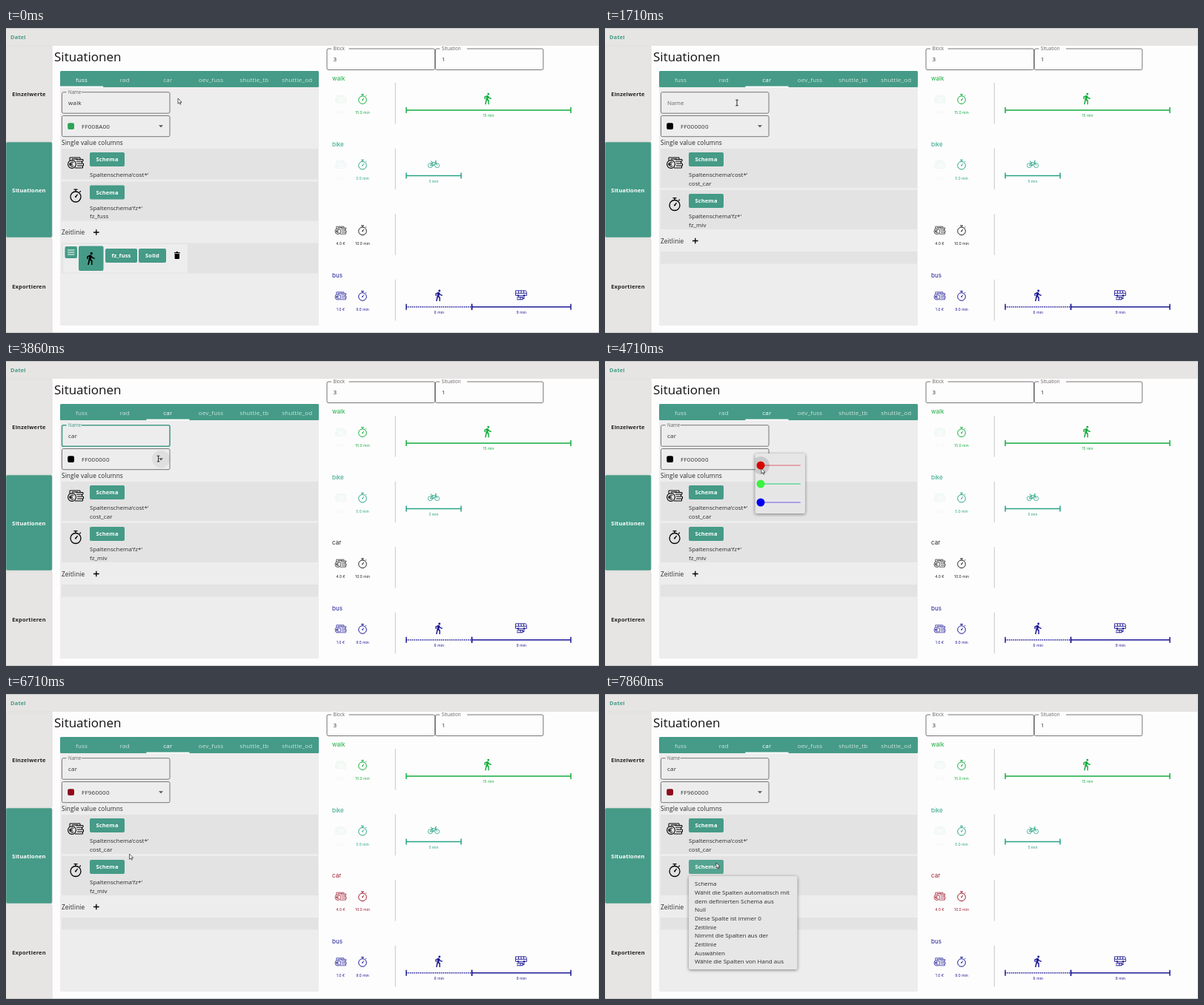
Animation of 800x412 px, one loop 8 s. Source, as an HTML page:

```html
<!DOCTYPE html>
<html lang="de">
<head>
<meta charset="utf-8">
<title>Situationen</title>
<style>
  html, body { margin: 0; width: 100%; height: 100%; overflow: hidden; background: #fefdfe; }
  svg { display: block; width: 100%; height: 100%; }
  text { font: 8px "Open Sans", "Noto Sans", sans-serif; fill: #2b2b2b; white-space: pre; }
  .title { font-size: 17px; fill: #111; }
  .bold { font-size: 7.5px; font-weight: 700; letter-spacing: .15px; }
  .head { font-size: 8.3px; letter-spacing: .1px; }
  .tab { letter-spacing: .2px; text-anchor: middle; }
  .field { letter-spacing: .25px; }
  .plot { font: 8px Inter, sans-serif; fill: currentColor; }
  .tiny { font: 5.1px Inter, sans-serif; fill: currentColor; text-anchor: middle; }
  .line { fill: none; stroke: currentColor; }
  .shadow { filter: drop-shadow(0 1px 2px #0007); }
</style>
</head>
<body>
<svg id="stage" viewBox="0 0 800 412"></svg>
<script>
const TEAL = '#459b87', PANEL = '#eeedee', ROW = '#e3e3e3', PAGE = '#fefdfe', GREY = '#777';
const LOOP = 8000, STEP = 1000 / 7;
const stage = document.getElementById('stage');

const clamp = v => Math.max(0, Math.min(1, v));
const mix = (a, b, p) => a + (b - a) * p;
const rect = (x, y, w, h, fill, r = 0, extra = '') =>
  `<rect x="${x}" y="${y}" width="${w}" height="${h}" rx="${r}" fill="${fill}" ${extra}/>`;
const text = (x, y, s, cls = '', extra = '') => `<text x="${x}" y="${y}" class="${cls}" ${extra}>${s}</text>`;
const circle = (x, y, r, fill, extra = '') => `<circle cx="${x}" cy="${y}" r="${r}" fill="${fill}" ${extra}/>`;
const line = (d, width = 1, extra = '') => `<path d="${d}" class="line" stroke-width="${width}" ${extra}/>`;
const group = (x, y, scale, body, extra = '') =>
  `<g transform="translate(${x} ${y}) scale(${scale})" ${extra}>${body}</g>`;
const button = (x, y, w, label) => rect(x, y, w, 19, TEAL, 2) +
  text(x + w / 2, y + 12.3, label, 'bold', 'style="fill:#fff;text-anchor:middle"');

// Icons are centred on their origin.
const walker = `<path transform="translate(-12.5 -12.3)" fill="currentColor" d="M13.5 5.5a2 2 0 1 0 0-4 2 2 0 0 0 0 4z
  M9.8 8.9L7 23h2.1l1.8-8 2.1 2v6h2v-7.5l-2.1-2 .6-3C14.8 12 16.8 13 19 13v-2c-1.9 0-3.5-1-4.3-2.4l-1-1.6
  c-.7-1.1-1.8-1.1-2.5-.9L6 8.3V13h2V9.6z"/>`;
const coins = line('M-8-3V-7H6V-4.5H10V-2H8.5V1H10.5V4H9.5V7H-1M0-4.5H6M1-2H8.5M2 1H8.5M2 4H9.5M-5-5H3') +
  circle(-5, 2, 5.4, 'none', 'stroke="currentColor" stroke-width="1.1"') +
  line('M-2.8-.4A3 3 0 1 0-2.8 4.4M-8.8 1.2H-4.2M-8.8 2.8H-4.2', 1);
const watch = circle(0, 1.5, 7, 'none', 'stroke="currentColor" stroke-width="1.3"') +
  line('M-2.5-8.3H2.5M0-8V-5.5M5.2-4.8L6.8-6.3M0 1.5L2.6-1.8', 1.3) + circle(0, 1.5, 1.1, 'currentColor');
const bike = circle(-4.6, 1.6, 3, 'none', 'stroke="currentColor" stroke-width=".8"') +
  circle(4.6, 1.6, 3, 'none', 'stroke="currentColor" stroke-width=".8"') +
  line('M-4.6 1.6L-2.4-2.3H2.9L0 1.6H-4.6M0 1.6L-3-4H-4.2M4.6 1.6L2.2-4.4H4', .9);
const bus = line('M-7.5-6H6Q7.5-5.5 7.5-1V.5H-7.5ZM-7-2.5H7M-3.5-6V-2.5M0-6V-2.5M3.5-6V-2.5', .9) +
  circle(-4, .8, 1.3, 'currentColor') + circle(4, .8, 1.3, 'currentColor') +
  line('M-6 4L-3 2.8H2L4 4.2M-6 6H1L5 3.6M-1 2V6M2 2V6', 1);

function outlined(x, y, label, value, { bg = PANEL, float = 1, focus = false } = {}) {
  const ink = focus ? TEAL : GREY;
  const size = mix(8, 6.2, float);
  const notch = float > .5 ? rect(x + 6, y - 1.5, label.length * 3.3 + 7, 3, bg) : '';
  return rect(x, y, 145.5, 28.5, 'none', 2, `stroke="${ink}" stroke-width="${focus ? 1.6 : 1}"`) + notch +
    text(x + 8.5, mix(y + 17, y + 2, float), label, '', `style="font-size:${size}px;fill:${focus ? TEAL : '#666'}"`) +
    text(x + 8.5, y + 17, value, 'field');
}

function shell() {
  const nav = [['Einzelwerte', 24, 129], ['Situationen', 154, 129], ['Exportieren', 285, 127]];
  return rect(0, 0, 800, 24, '#e6e5e3') + rect(0, 24, 62, 388, '#e6e5e3') + rect(0, 0, 800, .7, '#bbb') +
    text(6, 14.5, 'Datei', 'bold', `style="fill:${TEAL}"`) +
    nav.map(([label, y, h], i) => rect(0, y, 62.3, h, i === 1 ? TEAL : '#e6e5e3', 2, 'stroke="#d6d5d3" stroke-width=".5"') +
      text(31, y + (i === 2 ? 67 : 67.7), label, 'bold', `style="text-anchor:middle;fill:${i === 1 ? '#fff' : '#222'}"`)).join('') +
    rect(0, 411.3, 800, .7, '#bbb') + rect(799.4, 0, .6, 412, '#ccc') +
    text(65, 45, 'Situationen', 'title') + rect(73, 58, 349, 344, PANEL, 2);
}

function tabs(k) {
  const width = 349 / 6, p = clamp((k - 6) / 2), slide = 1 - (1 - p) ** 2;
  const active = k > 6 ? 2 : 0;
  const names = ['fuss', 'rad', 'car', 'oev_fuss', 'shuttle_tb', 'shuttle_od'];
  return rect(73, 58, 349, 22, TEAL, 1.5) +
    (k >= 5 && k <= 8 ? rect(73 + 2 * width, 58, width, 22, '#fff', 0, 'opacity=".19"') : '') +
    names.map((name, i) => text(73 + (i + .5) * width, 72.7, name, 'tab',
      `style="fill:${i === active ? '#fff' : '#cfe5dd'}"`)).join('') +
    rect(73 + 2 * width * slide, 78.6, width, 1.6, '#fff');
}

function schemaRow(y, icon, scheme, column) {
  return rect(75, y, 346, column ? 53 : 41.5, ROW) + group(94, y + 19, 1, icon) +
    button(113, y + 5, 47, 'Schema') +
    text(113, y + 38, `Spaltenschema'${scheme}*'`) + text(113, y + 49.5, column);
}

function timelineItem() {
  return rect(77, 292, 168, 38.5, PANEL) + rect(79.5, 295, 16.5, 16, TEAL, 2) +
    line('M83 300H92.5M83 303H92.5M83 306H92.5', 1.1, 'style="color:#fff"') +
    rect(98, 294.5, 33.5, 33.5, TEAL, 2) + group(114.5, 311.5, .8, walker) +
    button(134, 298, 43, 'fz_fuss') + button(179, 298, 37, 'Solid') +
    '<path d="M227 303h2.2l.8-1h1.6l.8 1h2.2v1.3H227zM227.6 305h6.4v6q0 1-1 1h-4.4q-1 0-1-1z"/>';
}

function editor(k, red) {
  const car = k >= 6, dy = car ? 11.5 : 0;
  const name = !car ? 'walk' : k < 19 ? '' : k < 20 ? 'ca' : 'car';
  const focus = k >= 13 && k < 29;
  const caret = k >= 13 && k < 17 || k >= 19 && k < 24;
  const hex = car ? 'FF' + red.toString(16).toUpperCase().padStart(2, '0') + '0000' : 'FF008A00';
  const swatch = car ? `rgb(${red * .94},${red * .08},${red * .17})` : '#2ba457';
  return outlined(75.5, 86.7, 'Name', name, { float: car ? clamp((k - 12) / 2) : 1, focus }) +
    (caret ? rect(84 + [0, 0, 9.3, 13][name.length], 96.5, .8, 9.5, TEAL) : '') +
    rect(75.5, 118.5, 145.5, 28.2, 'none', 2, `stroke="${GREY}"`) +
    rect(83.2, 128.2, 8.8, 8.8, swatch, 2) + text(102, 136, hex, 'field') +
    (k >= 27 && k < 30 ? circle(209, 132.5, 12, '#000', 'opacity=".06"') : '') +
    '<path d="M206 131.3h6l-3 3z" fill="#555"/>' +
    text(75, 158, 'Single value columns', 'head') +
    schemaRow(163, coins, 'cost', car ? 'cost_car' : '') +
    schemaRow(207.5 + dy, watch, 'fz', car ? 'fz_miv' : 'fz_fuss') +
    (k >= 49 ? rect(113, 224, 47, 19, '#fff', 2, 'opacity=".08"') : '') +
    text(75, 279.3 + dy, 'Zeitlinie', 'head') +
    line(`M118 ${276 + dy}h7.6m-3.8-3.8v7.6`, 1.3) +
    rect(75, 290.5 + dy, 346, car ? 16.5 : 41, ROW) + (car ? '' : timelineItem());
}

function span(x1, x2, minutes, dotted) {
  const mid = (x1 + x2) / 2;
  return line(`M${x1} 111H${x2}`, 1.5, dotted ? 'stroke-dasharray="1.5 1.1"' : '') +
    line(`M${x1} 107V115M${x2} 107V115`, 1.5) + text(mid, 120.2, minutes + ' min', 'tiny');
}

function option(row, color, title, cost, minutes, body = '') {
  const faint = cost ? 1 : .1;
  return group(0, row * 88.6, 1, text(440, 71, title, 'plot') +
    `<g opacity="${faint}">${group(451.5, 96, .72, coins)}${text(451.5, 116, cost || '0.0 €', 'tiny')}</g>` +
    group(481, 96, .76, watch) + text(481, 116, minutes + ' min', 'tiny') +
    rect(524.8, 74, .8, 55.5, '#bbb') + body, `style="color:${color}"`);
}

function preview(k) {
  const carShown = k < 19 || k >= 22 && k < 35 || k >= 42;
  return outlined(433, 28, 'Block', '3', { bg: PAGE }) + outlined(579.3, 28, 'Situation', '1', { bg: PAGE }) +
    option(0, '#16ad3f', 'walk', '', '15.0', span(540, 762, 15) + group(650, 95.5, .72, walker)) +
    option(1, '#27a384', 'bike', '', '5.0', span(540, 614, 5) + group(577, 95.5, 1, bike)) +
    (carShown ? option(2, k < 35 ? '#222' : '#9c1a2c', k < 19 ? '' : 'car', '4.0 €', '10.0') : '') +
    option(3, '#1d1a94', 'bus', '1.0 €', '9.0', span(540, 628.5, 6, true) + span(628.5, 762, 9) +
      group(584, 95.5, .72, walker) + group(695, 95, 1, bus));
}

// Popup surface that unrolls downwards while fading in.
function popup(id, x, y, w, h, p, body) {
  if (!p) return '';
  return `<clipPath id="${id}">${rect(x, y, w, h * p, '#000')}</clipPath>
    <g class="shadow" opacity="${p}">${rect(x, y, w, h * p, '#e7e6e7', 2)}<g clip-path="url(#${id})">${body}</g></g>`;
}

function sliders(k, red) {
  const p = k < 41 ? clamp((k - 28) / 3) : k === 41 ? .4 : 0;
  const rows = [['#d90000', '#e3a5a8', red], ['#3df23f', '#7fdcaa', 0], ['#0000ee', '#aaa3e6', 0]];
  const body = rows.map(([ink, track, value], i) => {
    const y = 141 + 25 * i, x = 210 + 53 * value / 255;
    const halo = i === 0 && k >= 33 && k < 41 ? circle(x, y, 12, '#000', 'opacity=".12"') : '';
    return rect(209, y - 1, 55, 2, track, 1) + rect(209, y - 1.3, x - 209, 2.6, ink, 1.3) + halo + circle(x, y, 5.5, ink);
  }).join('');
  return popup('sliderClip', 202.5, 125, 67.5, 81, p, body);
}

function menu(k) {
  const lines = ['Schema', 'Wählt die Spalten automatisch mit', 'dem definierten Schema aus', 'Null',
    'Diese Spalte ist immer 0', 'Zeitlinie', 'Nimmt die Spalten aus der', 'Zeitlinie', 'Auswählen',
    'Wähle die Spalten von Hand aus'];
  const body = lines.map((s, i) => text(121, 259.3 + 11.65 * i, s)).join('');
  return popup('menuClip', 113, 246, 146.5, 126, clamp((k - 52) / 3), body);
}

// Steps and pointer positions.
const path = [[0, 232, 95], [3, 218, 72], [7, 218, 72], [12, 178, 101], [15, 174, 104], [23, 174, 104],
  [27, 205.5, 132], [30, 205.5, 132], [33, 211, 145], [34, 211, 145], [39, 240.5, 146], [40, 240.5, 146],
  [42, 301, 155], [43, 300, 154], [44, 300, 154], [47, 166.5, 216], [50, 150, 228], [56, 150, 228]];

function pointer(k) {
  const i = path.findIndex(q => q[0] > k), [k0, x0, y0] = path[i - 1], [k1, x1, y1] = path[i];
  const p = (k - k0) / (k1 - k0), x = mix(x0, x1, p), y = mix(y0, y1, p);
  const beam = k >= 11 && k < 30;
  return group(x, y, 1, beam ? line('M-1.8-3.8H1.8M0-3.8V3.8M-1.8 3.8H1.8', .8)
    : '<path d="M0 0V7.2L1.7 5.7 2.9 8.2 4 7.7 2.9 5.3H5.1Z" fill="#fff" stroke="#222" stroke-width=".7"/>');
}

function draw(k) {
  const red = Math.round(150 * clamp((k - 34) / 5));
  stage.innerHTML = shell() + tabs(k) + editor(k, red) + preview(k) + sliders(k, red) + menu(k) + pointer(k);
}

// The screen refreshes seven times a second.
let shown = -1;
function tick() {
  const k = Math.min(55, Math.floor((performance.now() % LOOP + 6) / STEP));
  if (k !== shown) draw(shown = k);
  requestAnimationFrame(tick);
}
tick();
</script>
</body>
</html>
```
